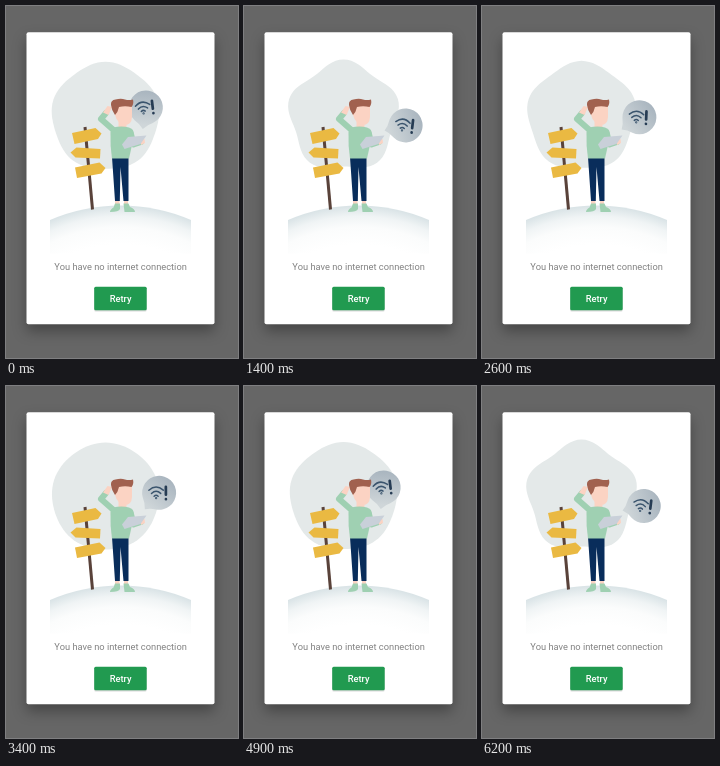
These frames come from a looping animation (232x352 px, 6.3 s). An HTML page:

```html
<!DOCTYPE html>
<html lang="en">
<head>
<meta charset="utf-8">
<title>No connection</title>
<style>
  html, body { margin: 0; width: 100%; height: 100%; overflow: hidden; background: #666; }
  svg { display: block; width: 232px; height: 352px; }
  text { font-family: Roboto, sans-serif; text-anchor: middle; }
  .card { fill: #fff; filter: drop-shadow(0 7px 7px rgba(0, 0, 0, .32)); }
  .skin { fill: #fbd3c3; }
  .hair { fill: #a1614f; }
  .shirt { fill: #9fd0b2; }
  .sleeve { fill: none; stroke: #9fd0b2; stroke-width: 6; stroke-linecap: round; stroke-linejoin: round; }
  .sign { fill: #eab942; }
  .icon { fill: none; stroke: #3a546d; stroke-width: 1.5; stroke-linecap: round; }
  .mark { stroke: #263c54; stroke-width: 2.7; }
</style>
</head>
<body>
<svg viewBox="0 0 232 352">
  <defs>
    <radialGradient id="ground" gradientUnits="userSpaceOnUse" cx="114.5" cy="378" r="178.5">
      <stop offset=".78" stop-color="#fff"/>
      <stop offset=".88" stop-color="#fbfcfc"/>
      <stop offset=".94" stop-color="#f0f4f5"/>
      <stop offset="1" stop-color="#d9e3e6"/>
    </radialGradient>
    <linearGradient id="glass" x1="0" y1="1" x2="0" y2="0">
      <stop offset=".1" stop-color="#cfd6d9"/>
      <stop offset="1" stop-color="#a9b5bf"/>
    </linearGradient>
  </defs>

  <rect width="232" height="352" fill="#666"/>
  <rect class="card" x="20.5" y="26.3" width="188" height="292" rx="2"/>

  <path id="blob" fill="#e4e9e9"/>
  <path d="M44 247.5V214A178.5 178.5 0 0 1 185 214V247.5Z" fill="url(#ground)"/>

  <g id="bubble">
    <path d="M-1-3.5Q-4-8-10-11.5A17 17 0 1 1 8-10Q3-8-1-3.5Z" fill="url(#glass)"/>
  </g>
  <g id="signal" class="icon">
    <path d="M-10-2.6Q-2.8-9 4.4-2.6M-7.4.6Q-2.8-3.6 1.8.6M-4.8 3.4Q-2.8 1.6-.8 3.4"/>
    <circle cx="-2.8" cy="5.4" r=".4"/>
    <path class="mark" d="M7-6V2M7 6.4V6.5"/>
  </g>

  <path d="M79 121L86.5 203.5" fill="none" stroke="#59423a" stroke-width="3"/>
  <g class="sign">
    <path d="M66 127L89.5 122L95.5 127.5L92 133L68.5 138Z"/>
    <path d="M64.5 146.5L70.5 141.5L94.5 143L94 152.5L69.5 151.5Z"/>
    <path d="M69 161.5L93.5 156.5L99.5 162L95.5 167.5L71 172Z"/>
  </g>

  <g>
    <path class="skin" d="M109 192h4.5v8H109ZM118 192h4v8h-4Z"/>
    <path d="M106 151H122.5V195H117.5L114.5 161L113.8 195H109Z" fill="#092d5b"/>
    <path class="shirt" d="M109 197.5H114V203Q113 206 104 206Q104 203.5 107.5 201.5ZM117.5 197.5H122.5L124 201Q129 203 129 206H118.5Z"/>
    <path class="sleeve" d="M107.5 124L95 113L100 107"/>
    <path class="skin" d="M97 106.500L101.500 100L106 101L102.500 109Z"/>
    <path class="skin" d="M112.500 112H120.500V123H112.500Z"/>
    <path class="shirt" d="M107 121.500Q116 119.500 123 121.500Q127.500 123 128 130L123 152.500H106Q104 140 104.500 126Z"/>
    <path class="skin" d="M109 99H126V111Q125.500 119 119 119Q111 117 109 109Z"/>
    <path class="hair" d="M105 99Q104.500 94 109.500 93.500Q115 92 119 93.500Q123 94.500 127 93.500Q128 98 125.500 101Q119 99.500 113 101Q112 106 109 109Q105.500 104 105 99Z"/>
    <path class="sleeve" d="M124.500 126L127.500 138.500L135 136"/>
    <path class="skin" d="M134 134L138.500 133L139 137L135 139Z"/>
    <path d="M116 138.500L122 131L140.500 129.500L134.500 138L118.500 143Z" fill="#c9d0d9"/>
  </g>

  <text x="114.600" y="264" font-size="9.300" fill="#828282">You have no internet connection</text>
  <rect x="88.200" y="281.700" width="52.500" height="23.800" rx="1.500" opacity=".15"/>
  <rect x="88.200" y="280.800" width="52.500" height="23.500" rx="1.500" fill="#219a50"/>
  <text x="114.600" y="296" font-size="9.300" font-weight="500" fill="#fff">Retry</text>
</svg>

<script>
  const LOOP = 6300, STEP = 100, PERIOD = 5000;
  const PIVOT = { x: 137.5, y: 126.5 }, REACH = 25;
  const CENTER = { x: 99.5, y: 110.5 }, RADIUS = 53.5, LOBES = 5;

  const linear = k => k;
  const easeOut = k => Math.sin(k * Math.PI / 2);

  // Bubble angle from vertical: fast rise, slow drift back, quick return
  const swing = [
    { t: 0, deg: 5, ease: easeOut },
    { t: 1300, deg: 75, ease: linear },
    { t: 3400, deg: 38, ease: easeOut },
    { t: 4600, deg: 3, ease: linear },
    { t: PERIOD, deg: 5 }
  ];

  const $ = id => document.getElementById(id);
  const blob = $('blob'), bubble = $('bubble'), signal = $('signal');

  function angleAt(t) {
    const i = swing.findIndex(key => t < key.t);
    const a = swing[i - 1], b = swing[i];
    return a.deg + (b.deg - a.deg) * a.ease((t - a.t) / (b.t - a.t));
  }

  // A circle that swells into soft lobes, one of them at the top
  function blobPath(t) {
    const wave = 1.8 * (1 + Math.cos((t - 1500) / PERIOD * 2 * Math.PI));
    const pts = [];
    for (let deg = 0; deg < 360; deg += 4) {
      const a = deg * Math.PI / 180;
      const r = RADIUS + wave * Math.cos(LOBES * a);
      pts.push(`${(CENTER.x + r * Math.sin(a)).toFixed(2)} ${(CENTER.y - r * Math.cos(a)).toFixed(2)}`);
    }
    return `M${pts.join('L')}Z`;
  }

  function draw(t) {
    blob.setAttribute('d', blobPath(t));
    const deg = angleAt(t), rad = deg * Math.PI / 180;
    const x = PIVOT.x + REACH * Math.sin(rad), y = PIVOT.y - REACH * Math.cos(rad);
    bubble.setAttribute('transform', `translate(${PIVOT.x} ${PIVOT.y}) rotate(${deg})`);
    signal.setAttribute('transform', `translate(${x} ${y}) rotate(${(deg - 40) * .2})`);
  }

  const start = performance.now();
  function tick() {
    const t = (performance.now() - start) % LOOP;
    draw(Math.floor(t / STEP) * STEP % PERIOD);
    requestAnimationFrame(tick);
  }
  tick();
</script>
</body>
</html>
```
